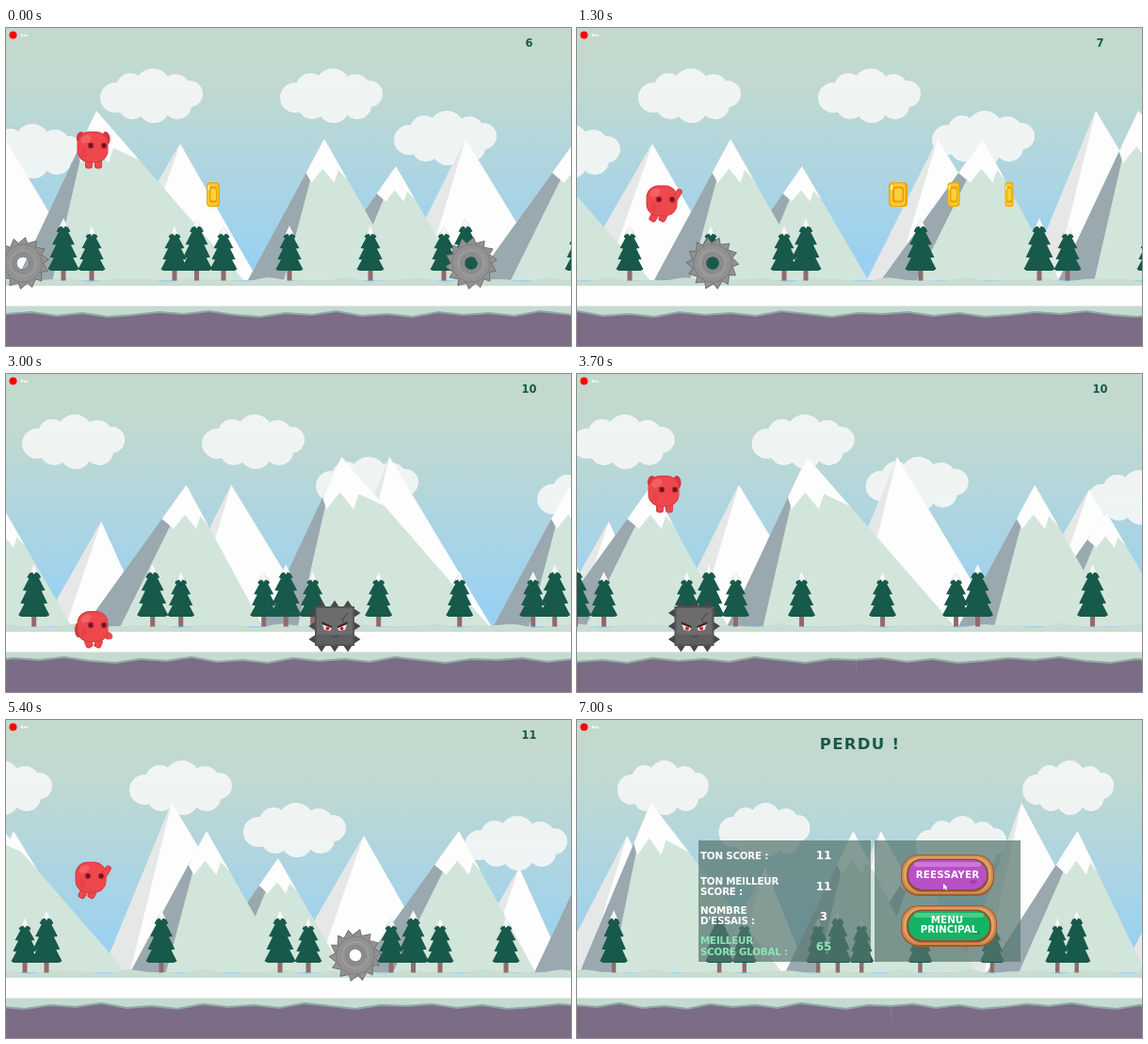
Animation of 600 by 338 pixels, one loop 7.1 s. Source, as an HTML page with a canvas:

```html
<!DOCTYPE html>
<html lang="fr">
<head>
<meta charset="utf-8">
<title>Snow runner</title>
<style>
html, body { margin: 0; width: 100%; height: 100%; overflow: hidden; background: #c3d9cc; }
canvas { display: block; width: 600px; height: 338px; }
</style>
</head>
<body>
<canvas id="stage" width="600" height="338"></canvas>
<script>
const c = document.getElementById('stage').getContext('2d');
const TAU = Math.PI * 2, LOOP = 7.1, TILE = 675, BASE = 268, END = 6.3;
const DARK = '#17594a', FONT = '"DejaVu Sans", sans-serif';

// Scroll distance over time; each layer moves at a whole multiple of it.
const scroll = [[0, 0], [1.3, 35], [2.2, 59.3], [3, 82.9], [4.3, 124.6], [5.4, 160], [7.1, 214.6]];
const jumps = [[-0.755, 1.32], [1.065, 1.32], [3.01, 1.28], [5.103, 1.32]];

// World x and spin phase
const coins = [[220, 0.8], [691, -5.03], [750, -4.17], [809, -6.13], [1713, -15.54]];
const saws = [18, 494, 1971];
const BLOCK = 1178;

const clouds = [[-28, 102], [100, 43], [291, 43], [412, 88]];
// x, peak y, left slope, right slope, width of the shade's foot
const whites = [[185, 123, 0.58, 0.57], [350, 157, 0.57, 0.45], [488, 118, 0.5, 0.61], [656, 88, 0.41, 0.6]];
const greens = [[96, 88, 0.47, 0.87, 38], [414, 147, 0.7, 0.58, 36], [338, 118, 0.54, 0.57, 38], [606, 118, 0.72, 0.54, 38]];
// x, tall or not
const trees = [[61, 1], [91, 0], [179, 0], [202.5, 1], [231, 0], [301, 0], [387, 0], [465, 0], [488, 1], [610, 1]];
const edge = [304, 302, 306, 303, 307, 305, 302, 304, 301, 305, 307, 303, 305, 301, 306, 304, 307, 302, 305, 303, 306, 301, 304, 307, 303];

const clamp = (v, a, b) => Math.min(b, Math.max(a, v));

function along(keys, t) {
  let i = 1;
  while (i < keys.length - 1 && t > keys[i][0]) i++;
  const [t0, a] = keys[i - 1], [t1, b] = keys[i];
  return a + (b - a) * (t - t0) / (t1 - t0);
}

function poly(points, fill) {
  c.beginPath();
  points.forEach(([x, y]) => c.lineTo(x, y));
  c.closePath();
  c.fillStyle = fill;
  c.fill();
}

function pill(x, y, w, h, r, fill) {
  c.beginPath();
  c.roundRect(x, y, w, h, r);
  c.fillStyle = fill;
  c.fill();
}

function oval(x, y, rx, ry, fill, turn = 0) {
  c.beginPath();
  c.ellipse(x, y, rx, ry, turn, 0, TAU);
  c.fillStyle = fill;
  c.fill();
}

function label(s, x, y, size, fill, align = 'left', gap = 0) {
  c.font = `bold ${size}px ${FONT}`;
  c.letterSpacing = gap + 'px';
  c.textAlign = align;
  c.fillStyle = fill;
  c.fillText(s, x, y);
}

function at(x, y, draw) {
  c.save();
  c.translate(x, y);
  draw();
  c.restore();
}

function tiled(offset, draw) {
  const x = -(offset % TILE);
  for (let i = -1; i < 3; i++) at(x + i * TILE, 0, draw);
}

function sky() {
  const g = c.createLinearGradient(0, 0, 0, 240);
  g.addColorStop(0, '#c4d9cc');
  g.addColorStop(0.25, '#c1d9d0');
  g.addColorStop(1, '#9bd1f0');
  c.fillStyle = g;
  c.fillRect(0, 0, 600, 338);
}

function cloud([x, y]) {
  c.beginPath();
  for (const [dx, dy, r] of [[16, 31, 16], [32, 20, 15], [56, 19, 19], [80, 22, 16], [95, 27, 14], [82, 39, 15], [57, 41, 17], [34, 39, 15], [50, 30, 20]]) {
    c.moveTo(x + dx + r, y + dy);
    c.arc(x + dx, y + dy, r, 0, TAU);
  }
  c.fillStyle = 'rgba(244,247,246,.93)';
  c.fill();
}

function whitePeak([x, y, l, r]) {
  const h = BASE - y;
  poly([[x, y], [x - l * h, BASE], [x + r * h, BASE]], '#fdfdfd');
  poly([[x, y], [x - l * h, BASE], [x - l * h * 0.6, BASE]], '#e6e7e7');
}

function greenPeak([x, y, l, r, foot]) {
  const h = BASE - y, p = (f, dy) => [x + f * h, y + dy * h];
  poly([[x, y], p(-l, 1), p(r, 1)], '#d2e5db');
  poly([p(-l * 0.2, 0.2), p(-l, 1), [x - l * h + foot, BASE], p(-0.08, 0.22)], '#9aa8af');
  poly([[x, y], p(-l * 0.24, 0.24), p(-0.09, 0.31), p(-0.01, 0.21), p(0.07, 0.31), p(0.1, 0.22), p(r * 0.29, 0.29)], '#fdfdfd');
}

function tree([x, tall]) {
  const top = tall ? 203 : 211, h = 258 - top, w = tall ? 16.5 : 14.5;
  c.fillStyle = '#916a6c';
  c.fillRect(x - 2.5, 256, 5, 12.5);
  const side = [[0.45, 0.24], [0.32, 0.26], [0.72, 0.49], [0.48, 0.5], [0.87, 0.74], [0.62, 0.75], [1, 0.97], [0.8, 1]];
  const half = s => side.map(([a, b]) => [x + s * a * w, top + b * h]);
  poly([[x, top], ...half(1), ...half(-1).reverse()], DARK);
  poly([[x, top - 1], [x + 5, top + 9], [x + 2, top + 7.5], [x, top + 10], [x - 2, top + 7.5], [x - 5, top + 9]], '#f5f8f6');
}

function hills() {
  const pts = [[0, 276]];
  for (let x = 0; x <= TILE; x += 9) {
    const a = x / TILE * TAU;
    pts.push([x, 267.5 + 1.5 * Math.sin(a * 9) + Math.sin(a * 16 + 1)]);
  }
  poly([...pts, [TILE, 276]], '#c9ddd2');
}

function soil() {
  const step = TILE / edge.length;
  const pts = [...edge, edge[0]].map((y, i) => [i * step, y]);
  poly([...pts, [TILE + 1, 338], [0, 338]], '#7c6c86');
  c.beginPath();
  pts.forEach(([x, y]) => c.lineTo(x, y));
  c.strokeStyle = '#8fa6a6';
  c.lineWidth = 2;
  c.stroke();
}

function scenery(cl, wh, gr, tr, so, squeeze) {
  sky();
  c.save();
  c.scale(squeeze, 1);
  tiled(cl, () => clouds.forEach(cloud));
  tiled(wh, () => whites.forEach(whitePeak));
  tiled(gr, () => greens.forEach(greenPeak));
  tiled(tr, hills);
  c.fillStyle = '#fefefe';
  c.fillRect(0, 274, TILE, 22);
  tiled(tr, () => trees.forEach(tree));
  c.fillStyle = '#c5dbcf';
  c.fillRect(0, 295.5, TILE, 20);
  tiled(so, soil);
  c.restore();
}

function coin(turn) {
  const w = Math.max(7.5, 20 * Math.abs(Math.cos(turn)));
  pill(-w / 2, -13, w, 26, Math.min(4, w / 3), '#eda30c');
  pill(-w / 2 + w * 0.07, -12, w * 0.82, 24, Math.min(4, w / 3), '#fdc92b');
  pill(-w * 0.3, -8.5, w * 0.6, 17, w * 0.15, '#e89f0d');
  pill(-w * 0.2, -6.5, w * 0.42, 13, w * 0.15, '#fbd23c');
  c.fillStyle = '#fff0a0';
  c.fillRect(-w * 0.4, -10, w * 0.12, 5);
}

function saw(turn) {
  c.rotate(turn);
  c.beginPath();
  const n = 14;
  for (let i = 0; i < n; i++) {
    const a = i / n * TAU, b = a + TAU / n * 0.7;
    c.lineTo(Math.cos(a) * 21.5, Math.sin(a) * 21.5);
    c.lineTo(Math.cos(b) * 27.5, Math.sin(b) * 27.5);
  }
  c.closePath();
  c.moveTo(7, 0);
  c.arc(0, 0, 7, 0, TAU);
  c.fillStyle = '#929292';
  c.fill('evenodd');
  c.lineWidth = 1;
  c.strokeStyle = '#6f6f6f';
  c.stroke();
  for (const [r, col] of [[20, '#7d7d7d'], [14, '#a6a6a6'], [10, '#808080']]) {
    c.beginPath();
    c.arc(0, 0, r, 0, TAU);
    c.strokeStyle = col;
    c.stroke();
  }
}

function block() {
  for (let side = 0; side < 4; side++) {
    for (const x of [-14, 0, 14]) poly([[x - 5, -20], [x, -27.5], [x + 5, -20]], '#47474b');
    c.rotate(TAU / 4);
  }
  c.fillStyle = '#555557';
  c.fillRect(-21, -21, 42, 42);
  c.fillStyle = '#6c6c6d';
  c.fillRect(-19, -19, 38, 38);
  c.fillStyle = '#5f5f61';
  c.fillRect(-19, 9, 38, 10);
  for (const s of [-1, 1]) {
    poly([[s * 13, -2], [s * 3, 2], [s * 5, 5], [s * 11, 4]], '#f6e9e6');
    oval(s * 7.5, 2.5, 2, 2, '#d8202a');
    poly([[s * 14, -5], [s * 3, 0], [s * 3, 2], [s * 13, -2]], '#3a2528');
  }
  c.strokeStyle = '#3f3f42';
  c.lineWidth = 1;
  c.beginPath();
  c.moveTo(14, -14);
  c.lineTo(8, -7);
  c.lineTo(10, -4);
  c.moveTo(-3, 11);
  c.lineTo(4, 11);
  c.stroke();
}

function heroShape(lean, ears, armUp, swing, stride) {
  const red = '#ee484c', deep = '#d4383f';
  c.save();
  c.translate(lean ? -2 : 0, -3);
  if (ears) {
    oval(-13, -11, 4, 6, deep, 0.3);
    oval(14.5, -10, 4, 7, deep, -0.15);
  }
  const foot = lean ? -0.5 : 0;
  for (const s of [-1, 1]) {
    c.save();
    c.translate(s * 5 + (lean ? -1.5 : 1) + s * Math.abs(stride) * 2, 13);
    c.rotate(-foot + stride * s * 0.4);
    pill(-4, 0, 8, 9.5, 3, deep);
    pill(-3.2, 0, 6.5, 8.5, 3, red);
    c.restore();
  }
  if (swing > 0.2) {
    oval(16, 9, 5.5 * swing, 4, red, 0.4);
    oval(-15, 3, 4, 8, deep);
  }
  pill(-16.5, -17, 33, 33, 13, deep);
  pill(-15.5, -16, 31.5, 31, 12.5, red);
  oval(-7, -9, 6, 4, '#f26063', -0.5);
  oval(-9, 6, 3, 5, '#e54147');
  if (armUp) {
    c.lineCap = 'round';
    for (const [w, col] of [[6.5, deep], [5, red]]) {
      c.beginPath();
      c.moveTo(13, -1);
      c.lineTo(18.5, -10);
      c.lineWidth = w;
      c.strokeStyle = col;
      c.stroke();
    }
  }
  const ex = lean ? -1 : 0;
  for (const x of [-2 + ex, 12 + ex]) {
    oval(x, -2, 3.2, 3.2, '#b62732');
    oval(x, -2, 2.2, 2.4, '#701523');
  }
  c.restore();
}

function hero(t) {
  const jump = jumps.find(([s, d]) => t > s && t < s + d);
  if (!jump) {
    const w = TAU * (t - 3) / 0.4;
    at(92, 272, () => heroShape(false, false, false, Math.cos(w), Math.cos(w)));
    return;
  }
  const p = (t - jump[0]) / jump[1];
  const high = Math.abs(p - 0.5) < 0.15;
  at(92, 272 - 580 * p * (1 - p), () => heroShape(!high, high, !high, 0, 0));
}

function play(t) {
  const d = along(scroll, t), front = d * 10;
  scenery(d, d * 3, d * 5, d * 7, front, 1);
  let score = 6;
  for (const [x, phase] of coins) {
    if (x - front < 117) score += x - front > -1e4 ? 1 : 0;
    else at(x - front, 177, () => coin(phase + 3.87 * t));
  }
  // The first coin counts only once it is reached, so the tally starts at six.
  const drop = clamp((t - 2.35) / 0.5, 0, 1);
  at(BLOCK - front, 119 + 149 * drop * drop, block);
  hero(t);
  for (const x of saws) at(x - front, 250, () => saw(t * 6));
  label(String(score), 555.5, 20, 11.5, DARK, 'center');
}

function button(x, y, w, fill, shine) {
  pill(x, y, w, 44, 19, '#9c5a2c');
  pill(x + 1, y + 1, w - 2, 41, 18, '#d08a4c');
  pill(x + 3, y + 2.5, w - 6, 37, 17, '#dfa367');
  pill(x + 6, y + 4.5, w - 12, 35, 16, '#8f5230');
  pill(x + 8, y + 6, w - 16, 31, 15, fill);
  pill(x + 14, y + 8, w - 28, 5, 2.5, shine);
  oval(x + w - 22, y + 29, 4, 2, 'rgba(70,30,70,.25)');
}

function pointer(t) {
  if (t >= 6.95) return [389, 174];
  return t < 6.45 ? [396, 216] : t < 6.55 ? [423, 240] : [450, 260];
}

function gameOver(t) {
  scenery(242.7, 125, 7.9, 566, 300, 600 / TILE);
  c.fillStyle = 'rgba(88,119,111,.72)';
  c.fillRect(129, 128, 183, 129);
  c.fillRect(316, 128, 155, 129);
  label('PERDU !', 300.5, 31, 16.5, DARK, 'center', 1.3);

  const size = 10.3, mint = '#8ee3b5';
  const rows = [
    [['TON SCORE :', 147.5], ['11', 147.5]],
    [['TON MEILLEUR', 175], ['SCORE :', 186], ['11', 181]],
    [['NOMBRE', 206], ["D'ESSAIS :", 216.5], ['3', 212.5]],
    [['MEILLEUR', 238], ['SCORE GLOBAL :', 249.5], ['65', 245]]
  ];
  rows.forEach((row, i) => {
    const col = i === 3 ? mint : '#fff';
    row.forEach(([s, y], j) => {
      if (j === row.length - 1) label(s, 262, y, 12, col, 'center');
      else label(s, 131, y, size, col, 'left', -0.2);
    });
  });

  button(344, 143, 99, '#b850c6', '#cd78d8');
  label('REESSAYER', 393.5, 167.5, size, '#fff', 'center', 0.2);
  button(344, 197, 102, '#13b463', '#4acb8a');
  label('MENU', 393, 216, size, '#fff', 'center');
  label('PRINCIPAL', 395, 226, size, '#fff', 'center');

  const [x, y] = pointer(t);
  poly([[x, y], [x, y + 6], [x + 1.5, y + 4.7], [x + 3, y + 7], [x + 4, y + 6.4], [x + 2.8, y + 4.2], [x + 4.4, y + 4]], '#fff');
}

function frame(now) {
  // The picture steps ten times a second.
  const t = Math.floor((now / 1000 % LOOP) * 10 + 1e-6) / 10;
  if (t < END - 0.01) play(t);
  else gameOver(t);
  oval(7.5, 7.5, 4, 4, '#f00');
  label('Rec', 15.5, 9.3, 4, '#fff');
}

const start = performance.now();
function tick() {
  frame(performance.now() - start);
  requestAnimationFrame(tick);
}
tick();
</script>
</body>
</html>
```
